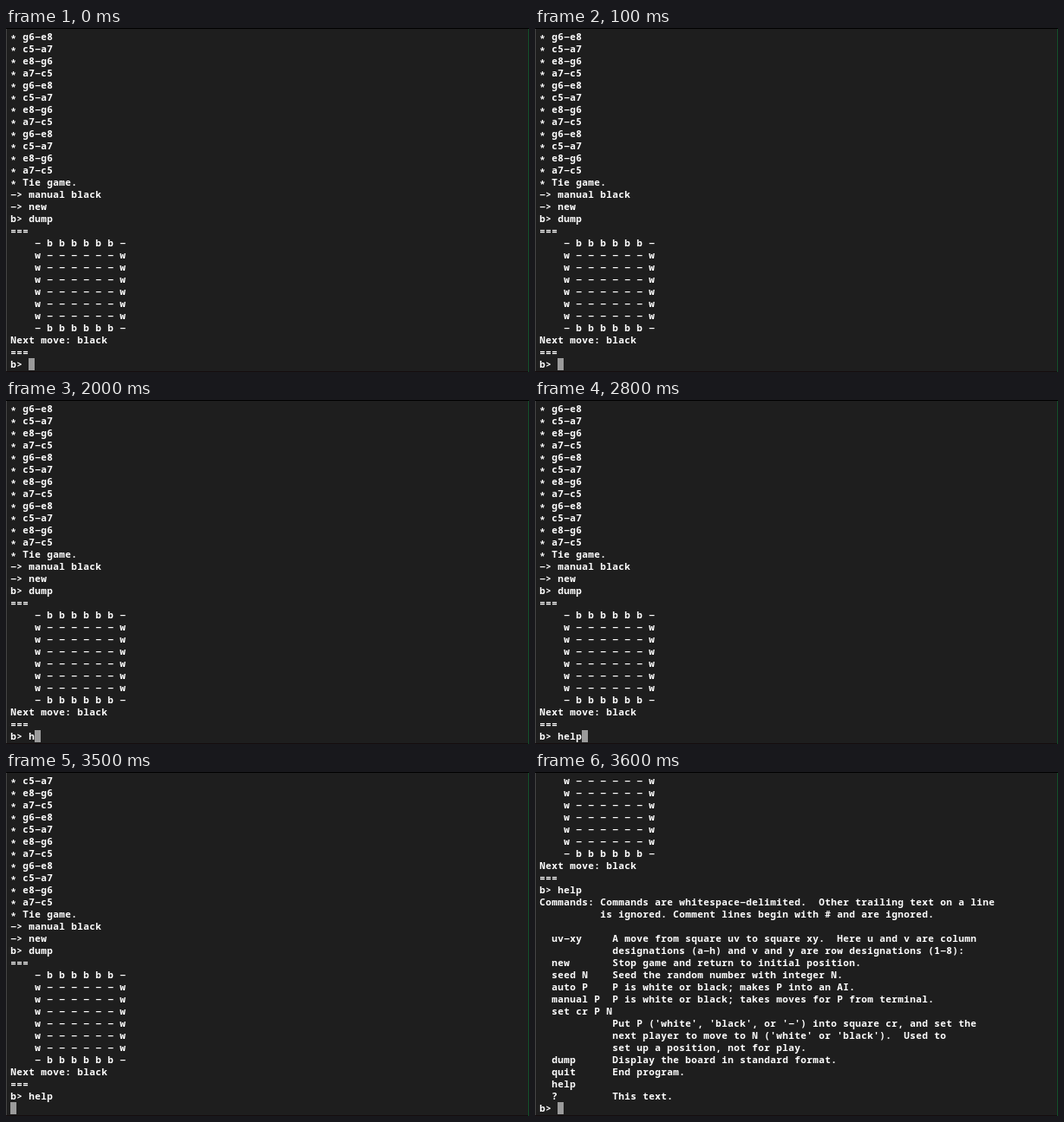
These frames come from a looping animation (603x397 px, 7600 ms). An HTML page with a canvas:

```html
<!DOCTYPE html>
<html lang="en">
<head>
<meta charset="utf-8">
<title>Terminal board game</title>
<style>
html, body { margin: 0; width: 100%; height: 100%; overflow: hidden; background: #1e1e1e; }
canvas { display: block; }
</style>
</head>
<body>
<canvas id="term" width="603" height="397"></canvas>
<script>
const W = 603, H = 397, LOOP = 7600;
const CELL = 7, LINE = 14, LEFT = 5, TOP = 3, ROWS = 28;
const ctx = document.getElementById('term').getContext('2d');

const moves = ['g6-e8', 'c5-a7', 'e8-g6', 'a7-c5'].map(m => '* ' + m);
const edge = '    - b b b b b b -';
const middle = Array(6).fill('    w - - - - - - w');

const log = [
  ...moves, ...moves, ...moves,
  '* Tie game.',
  '-> manual black',
  '-> new',
  'b> dump',
  '===',
  edge, ...middle, edge,
  'Next move: black',
  '==='
];

const help = `Commands: Commands are whitespace-delimited.  Other trailing text on a line
          is ignored. Comment lines begin with # and are ignored.

  uv-xy     A move from square uv to square xy.  Here u and v are column
            designations (a-h) and v and y are row designations (1-8):
  new       Stop game and return to initial position.
  seed N    Seed the random number with integer N.
  auto P    P is white or black; makes P into an AI.
  manual P  P is white or black; takes moves for P from terminal.
  set cr P N
            Put P ('white', 'black', or '-') into square cr, and set the
            next player to move to N ('white' or 'black').  Used to
            set up a position, not for play.
  dump      Display the board in standard format.
  quit      End program.
  help
  ?         This text.`.split('\n');

const keyTimes = [2000, 2100, 2700, 2800];
const ENTER = 3500, REPLY = 3600;

function screenAt(t) {
  const typed = 'help'.slice(0, keyTimes.filter(k => t >= k).length);
  const lines = [...log, 'b> ' + typed];
  if (t >= REPLY) lines.push(...help, 'b> ');
  else if (t >= ENTER) lines.push('');
  return lines.slice(-ROWS);
}

function drawChar(ch, x, base) {
  if (ch === '-') ctx.fillRect(x + 0.8, base - 4, 5.8, 1.2);
  else if (ch !== ' ') ctx.fillText(ch, x + CELL / 2, base + (ch === '*' ? 2 : 0));
}

function bar(color, x, y, w, h) {
  ctx.fillStyle = color;
  ctx.fillRect(x, y, w, h);
}

function draw(t) {
  bar('#1e1e1e', 0, 0, W, H);
  bar('#454545', 0, 0, 1, H);
  bar('#000', 0, 0, W, 1);
  bar('#150d0e', 0, H - 1, W, 1);
  bar('#14502a', W - 1, 1, 1, H - 1);

  const lines = screenAt(t);
  const last = lines.length - 1;
  bar('#9b9b9b', LEFT + lines[last].length * CELL, TOP + last * LINE, CELL, LINE);

  ctx.font = '600 11px "Noto Sans Mono", "DejaVu Sans Mono", monospace';
  ctx.textAlign = 'center';
  ctx.textBaseline = 'alphabetic';
  ctx.fillStyle = '#fff';
  lines.forEach((line, row) => {
    const base = TOP + row * LINE + 11;
    [...line].forEach((ch, col) => drawChar(ch, LEFT + col * CELL, base));
  });
}

const start = performance.now();
function tick() {
  draw((performance.now() - start) % LOOP);
  requestAnimationFrame(tick);
}
tick();
</script>
</body>
</html>
```
